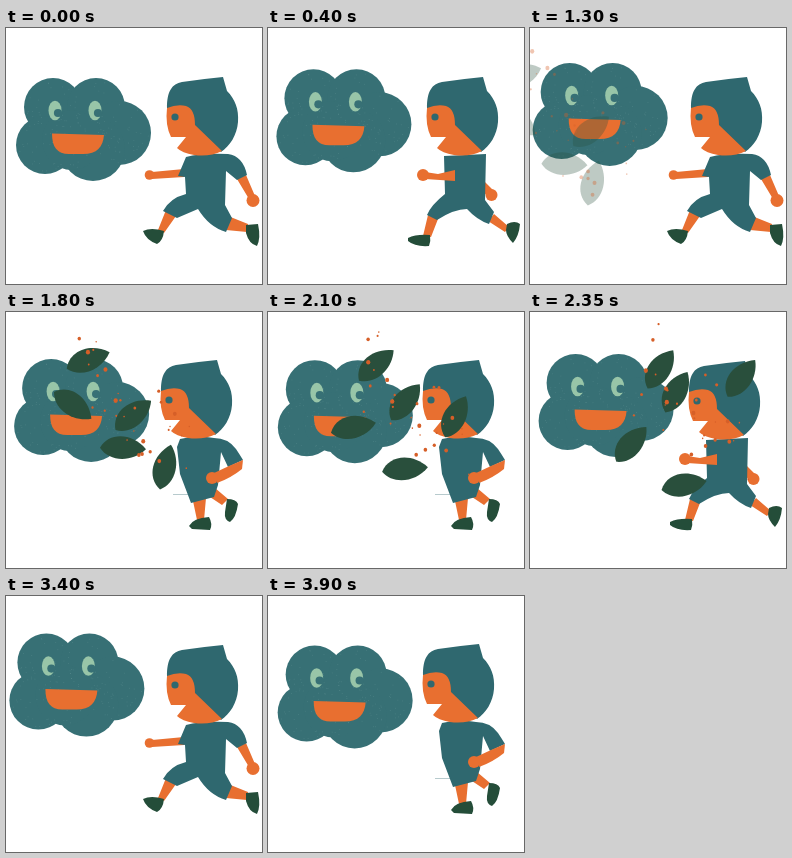
Animation of 256x256 px, one loop 3.95 s. Source, as an HTML page with a canvas:

```html
<!DOCTYPE html>
<html lang="en">
<head>
<meta charset="utf-8">
<title>Running with a cloud</title>
<style>
html, body { margin: 0; width: 100%; height: 100%; overflow: hidden; background: #fff; }
canvas { display: block; width: 256px; height: 256px; }
</style>
</head>
<body>
<canvas id="stage"></canvas>
<script>
const LOOP = 3950, STEP = 50;
const TEAL = '#2f686f', CLOUD = '#377075', ORANGE = '#e86f30', MINT = '#98c5a8';
const SHOE = '#244d39', LEAF = '#294f3c', DOT = '#d65f28';
const canvas = document.getElementById('stage');
const ctx = canvas.getContext('2d');
const scale = window.devicePixelRatio || 1;
canvas.width = canvas.height = 256 * scale;

const clamp = v => Math.max(0, Math.min(1, v));
const ramp = (t, a, b) => clamp((t - a) / (b - a));
const smooth = u => u * u * (3 - 2 * u);
const mix = (a, b, u) => a + (b - a) * u;

let seed = 11;
const rand = () => (seed = (seed * 16807) % 2147483647) / 2147483647;
const between = (a, b) => mix(a, b, rand());

function shape(color, d) {
  ctx.fillStyle = color;
  ctx.fill(new Path2D(d));
}

function oval(color, x, y, rx, ry = rx) {
  ctx.fillStyle = color;
  ctx.beginPath();
  ctx.ellipse(x, y, rx, ry, 0, 0, Math.PI * 2);
  ctx.fill();
}

// Cloud: bobs twice per loop, drifting left a little behind the rise
const LOBES = [[47, 79, 29], [90, 79, 29], [39, 117, 29], [113, 105, 32], [87, 121, 32], [66, 112, 30]];
const grain = Array.from({ length: 160 }, () => {
  const [x, y, r] = LOBES[Math.floor(rand() * LOBES.length)];
  const a = between(0, Math.PI * 2), d = Math.sqrt(rand()) * (r - 2);
  return [x + Math.cos(a) * d, y + Math.sin(a) * d];
});
const lift = phase => Math.sin(Math.PI * phase) ** 1.4;

function drawCloud(t) {
  const phase = (t / LOOP * 2) % 1;
  ctx.save();
  ctx.translate(-7.5 * lift(phase ** 1.4), -18 * lift(phase));
  for (const [x, y, r] of LOBES) oval(CLOUD, x, y, r);
  ctx.fillStyle = 'rgba(130,172,172,.3)';
  for (const [x, y] of grain) ctx.fillRect(x, y, .8, .8);
  for (const x of [49, 89]) {
    oval(MINT, x, 82.5, 6.5, 9.8);
    oval(CLOUD, x + 3, 85, 4.1);
  }
  shape(ORANGE, 'M46 105.5L98 107C97 119 91 126 77 126L63 126C51 126 46 119 46 105.5Z');
  ctx.restore();
}

// Boy
function drawHead(dx, dy) {
  ctx.save();
  ctx.translate(dx, dy);
  shape(TEAL, 'M155 79C155 62 160 55 170 53Q190 50 211 48L215 62C223 70 227 80 226 93C225 106 218 117 209 123L180 98Z');
  shape(ORANGE, 'M155 79Q165 75 174 77Q183 80 183 96L210 122Q198 128 182 126Q170 124 165 119L174 108L159 108Q153 96 155 79Z');
  oval(TEAL, 163, 88, 3.6);
  ctx.restore();
}

function strideFront() {
  shape(ORANGE, 'M160 182L170 188L158 205L152 202ZM222 188L242 196L241 204L220 202Z');
  shape(SHOE, 'M137 203Q145 199 158 203Q157 213 151 216Q140 212 137 203ZM240 197L252 196Q255 210 251 218Q243 216 240 205Z');
  shape(ORANGE, 'M146 144L178 141L178 149L146 151ZM231 151L240 147L249 168L243 171Z');
  oval(ORANGE, 143.5, 147, 4.8);
  oval(ORANGE, 247, 172.5, 6.5);
  shape(TEAL, 'M180 129Q195 125 222 126Q237 128 241 147L231 152L220 143L219 177L226 190L220 204Q203 199 192 181L171 190L157 183Q164 170 180 166L179 149L172 148Z');
  drawHead(6, 1);
}

function passing() {
  ctx.fillStyle = 'rgba(49,104,111,.35)';
  ctx.fillRect(167, 182, 17, 1);
  shape(ORANGE, 'M187 189L200 186L198 208L191 208ZM201 183L209 176L222 187L216 193Z');
  shape(SHOE, 'M183 214Q187 206 203 205Q207 212 204 218L186 217ZM221 187Q230 187 232 192Q230 206 224 210Q218 208 219 200Z');
  shape(TEAL, 'M174 127Q190 123 208 126Q222 126 230 137Q234 143 237 148L222 155L215 140L212 173L208 185L185 191L174 162L171 135Z');
  shape(ORANGE, 'M223 154L237 148L236 157Q225 166 211 171L208 161Z');
  oval(ORANGE, 206, 166, 6);
  drawHead(0, 0);
}

function strideBack() {
  shape(ORANGE, 'M160 187L170 191L163 209L155 208ZM220 193L226 186L241 199L237 204ZM208 155L214 151L225 162L219 168Z');
  oval(ORANGE, 223.5, 167, 6);
  shape(SHOE, 'M140 210Q148 206 162 207Q163 213 161 218Q147 219 140 213ZM239 196Q247 192 252 196Q251 208 245 215Q238 208 238 202Z');
  shape(TEAL, 'M176 128L218 126L217 172L226 184L221 196Q209 192 199 181Q186 181 169 192L159 187Q163 177 177 166Z');
  shape(ORANGE, 'M157 144L170 146L187 142L187 153L157 151Z');
  oval(ORANGE, 155, 147, 6);
  drawHead(4, 1);
}

const POSES = [strideFront, passing, strideBack, passing];
const drawBoy = t => POSES[Math.floor((t + 40) / (LOOP / 24)) % 4]();

// Wind: u runs 0 to 1 while things hover, with a rush before and after
const windTime = t => (t - 1800) / 550;
const rush = u => 20 * u * (u - 1) * (u - .5);
const fall = u => 40 * Math.max(0, u - 1) ** 2;

// Each leaf hovers from one pose to another: x, y, degrees
const LEAVES = [
  [[82, 48, -20], [130, 57, -55]],
  [[67, 93, 37], [101, 132, -48]],
  [[127, 103, -38], [146, 80, -60]],
  [[117, 136, 3], [154, 173, -10]],
  [[159, 155, -75], [211, 66, -52]]
];

function drawLeaves(t) {
  const u = windTime(t), hover = smooth(clamp(u));
  ctx.globalAlpha = ramp(t, 1150, 1650) * (1 - ramp(t, 2700, 3150));
  for (const [[x, y, turn], [x2, y2, turn2]] of LEAVES) {
    ctx.save();
    ctx.translate(mix(x, x2, u) + rush(u), mix(y, y2, hover) + fall(u));
    ctx.rotate((mix(turn, turn2, hover) + fall(u)) * Math.PI / 180);
    shape(LEAF, 'M-23 1C-15 -15 8 -16 23 0C10 14 -13 15 -23 1Z');
    ctx.restore();
  }
}

// Seeds scatter along a diagonal band
const seeds = Array.from({ length: 30 }, () => {
  const x = between(62, 196);
  return {
    x, y: 30 + (x - 60) * .8 + between(-30, 60),
    drift: between(10, 50), rise: between(-30, 20),
    r: .7 + rand() ** 2 * 1.5, end: between(2400, 3050)
  };
});

function drawSeeds(t) {
  const u = windTime(t);
  for (const s of seeds) {
    ctx.globalAlpha = ramp(t, 1100, 1650) * (1 - ramp(t, s.end, s.end + 180));
    oval(DOT, s.x + s.drift * u + rush(u), s.y + s.rise * u, s.r, s.r * 1.1);
  }
}

function draw(now) {
  const t = Math.floor((now % LOOP) / STEP) * STEP;
  ctx.setTransform(scale, 0, 0, scale, 0, 0);
  ctx.globalAlpha = 1;
  ctx.fillStyle = '#fff';
  ctx.fillRect(0, 0, 256, 256);
  drawCloud(t);
  drawBoy(t);
  drawLeaves(t);
  drawSeeds(t);
}

const start = performance.now();
function tick() {
  draw(performance.now() - start);
  requestAnimationFrame(tick);
}
tick();
</script>
</body>
</html>
```
